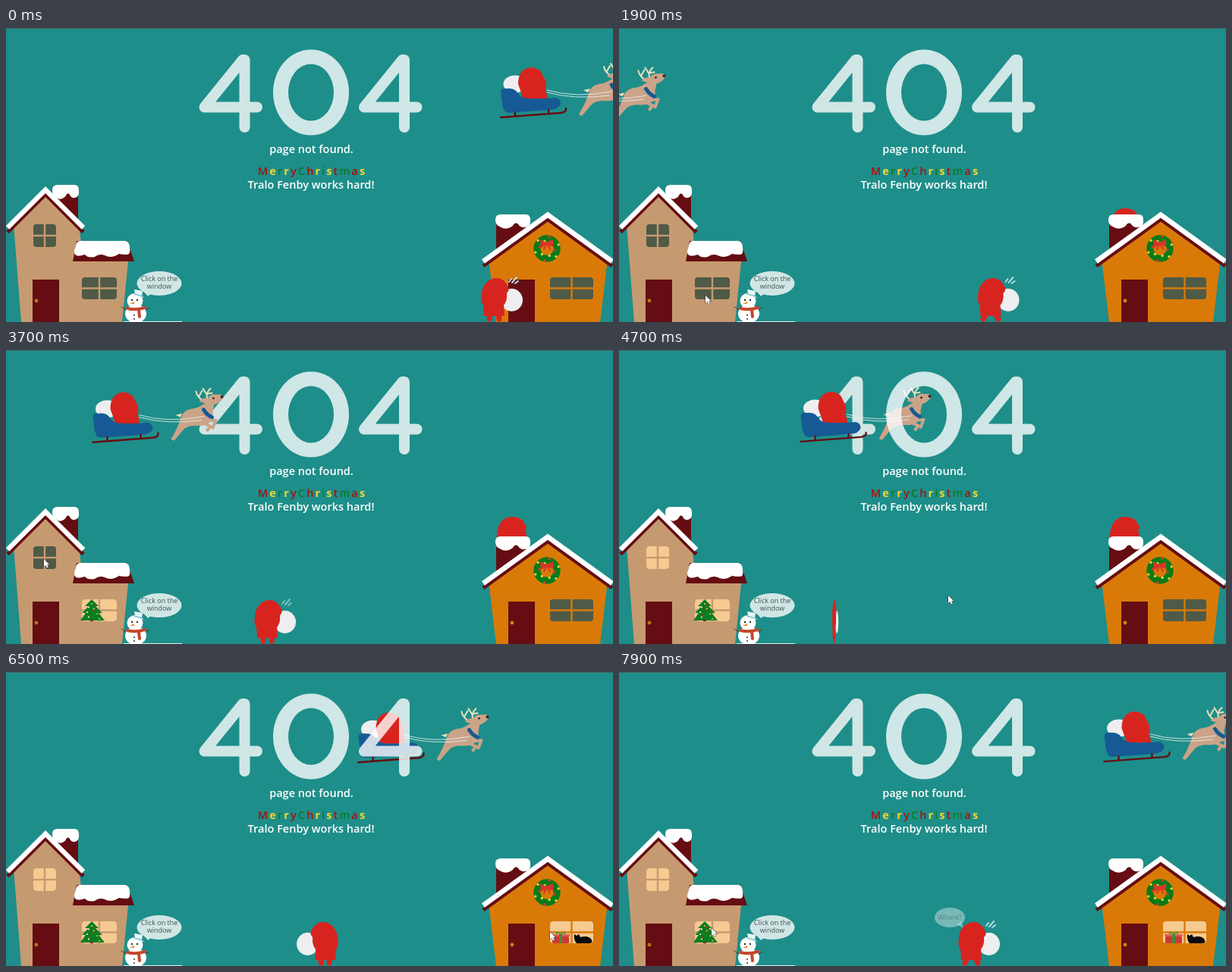
An HTML page with a canvas that plays this animation: 800x388 px, repeating every 8 s.

```html
<!DOCTYPE html>
<html lang="en">
<head>
<meta charset="utf-8">
<title>404 page not found</title>
<style>
html, body { margin: 0; width: 100%; height: 100%; overflow: hidden; background: #1e8e8a; }
canvas { display: block; width: 800px; height: 388px; }
</style>
</head>
<body>
<canvas id="stage"></canvas>
<script>
const W = 800, H = 388, LOOP = 8000;
const canvas = document.getElementById('stage');
const dpr = window.devicePixelRatio || 1;
canvas.width = W * dpr;
canvas.height = H * dpr;
const c = canvas.getContext('2d');

const BG = '#1e8e8a', MAROON = '#650d12', TAN = '#c69a70', ORANGE = '#d97a08',
  DARK = '#4f5a47', LIT = '#f6ca91', RED = '#d8241f', PALE = '#d0e6e5',
  BLUE = '#165a95', FUR = '#cba388', GLASS = 'rgba(255,255,255,.79)';
const FONT = '"Open Sans", "Noto Sans", sans-serif';

// ---------- helpers ----------
function shape(d, fill) {
  c.fillStyle = fill;
  c.fill(new Path2D(d));
}
function line(d, color, width, cap = 'round', join = 'round') {
  c.strokeStyle = color;
  c.lineWidth = width;
  c.lineCap = cap;
  c.lineJoin = join;
  c.stroke(new Path2D(d));
}
function oval(x, y, rx, ry, fill) {
  c.fillStyle = fill;
  c.beginPath();
  c.ellipse(x, y, rx, ry, 0, 0, 7);
  c.fill();
}
function rect(x, y, w, h, fill, r = 0) {
  c.fillStyle = fill;
  c.beginPath();
  c.roundRect(x, y, w, h, r);
  c.fill();
}
function text(str, x, y, size, color, weight = 400, align = 'center') {
  c.font = `${weight} ${size}px ${FONT}`;
  c.textAlign = align;
  c.fillStyle = color;
  c.fillText(str, x, y);
}
const clamp = v => Math.max(0, Math.min(1, v));
const smooth = v => v * v * (3 - 2 * v);
const ramp = (t, a, b) => clamp((t - a) / (b - a));

// Keys are [time, value, value...]
function track(t, keys, ease = v => v) {
  let i = 0;
  while (i < keys.length - 2 && t >= keys[i + 1][0]) i++;
  const a = keys[i], b = keys[i + 1], k = ease(ramp(t, a[0], b[0]));
  return a.slice(1).map((v, n) => v + (b[n + 1] - v) * k);
}

// ---------- lettering ----------
function four(x, color) {
  line(`M${x + 60.5} 42 V131 M${x + 58} 42 L${x + 7.5} 104.5 H${x + 77}
    M${x + 58} 42 H${x + 60.5}`, color, 14);
}
function zero() {
  c.fillStyle = GLASS;
  c.beginPath();
  c.ellipse(402, 85, 50, 56.5, 0, 0, 7);
  c.ellipse(402, 85, 30, 37.5, 0, 0, 7);
  c.fill('evenodd');
}
function greeting() {
  const word = 'MerryChristmas', hues = 'rygyrgrygyrgry';
  const paint = { r: '#a8100f', y: '#f6d62c', g: '#0b7a26' };
  const weight = i => hues[i] === 'y' ? 700 : 600;
  const widths = [...word].map((ch, i) => {
    c.font = `${weight(i)} 14.5px ${FONT}`;
    return c.measureText(ch).width + 2.1;
  });
  let x = 403.5 - widths.reduce((a, b) => a + b) / 2;
  [...word].forEach((ch, i) => {
    text(ch, x, 194, 14.5, paint[hues[i]], weight(i), 'left');
    x += widths[i];
  });
}
function captions() {
  text('page not found.', 402.5, 165, 14.5, '#fff', 600);
  greeting();
  text('Tralo Fenby works hard!', 402, 212, 14.5, '#fff', 600);
}

// ---------- houses ----------
function panes(x, y, w, h, wall, glow, decor) {
  rect(x, y, w, h, DARK, 4);
  if (glow > 0) {
    c.save();
    c.globalAlpha = glow;
    rect(x, y, w, h, LIT, 4);
    c.restore();
  }
  rect(x + w / 2 - 1.2, y, 2.4, h, wall);
  rect(x, y + h / 2 - 1.2, w, 2.4, wall);
  if (glow > 0 && decor) {
    c.save();
    c.globalAlpha = glow;
    decor();
    c.restore();
  }
}
function door(x, knob) {
  rect(x, 332, 35, 56, MAROON);
  oval(x + 5, 360, 2.4, 2.4, knob);
}
function cap(x, y, w) {
  shape(`M${x} ${y + 7} Q${x} ${y} ${x + 7} ${y} H${x + w - 6} Q${x + w} ${y} ${x + w} ${y + 7}
    Q${x + w + 1} ${y + 16} ${x + w * .85} ${y + 17} Q${x + w * .7} ${y + 18} ${x + w * .64} ${y + 12}
    Q${x + w * .55} ${y + 10} ${x + w * .5} ${y + 15} Q${x + w * .3} ${y + 22} ${x + w * .12} ${y + 16}
    Q${x} ${y + 14} ${x} ${y + 7}Z`, '#fff');
}
function roof(x, y, w, h) {
  const slope = dy => `M${x - w} ${y + h + dy} L${x} ${y + dy} L${x + w} ${y + h + dy}`;
  line(slope(6), MAROON, 5, 'butt', 'miter');
  line(slope(0), '#fff', 6.5, 'butt', 'miter');
}
function pineTree() {
  shape('M113 329 L122 338 H118 L127 347 H122 L130 357 H98 L105 347 H100 L109 338 H104Z', '#0b7d22');
  const dots = ['#e9d23c', '#d8241f', '#fff'];
  for (let i = 0; i < 10; i++) {
    const y = 335 + i * 2.2;
    oval(113 + Math.sin(i * 2.3) * (y - 330) * .42, y, 1, 1, dots[i % 3]);
  }
  rect(111, 356, 4, 2, '#6b3a1c');
}
function giftAndCat() {
  rect(720, 349, 22, 9, '#c93a31', 1);
  rect(719, 346, 24, 3, '#e0604c', 1);
  rect(729, 346, 4, 12, '#3d8c3e');
  line('M731 346 Q724 341 726 346 M731 346 Q738 341 736 346', '#3d8c3e', 1.4);
  shape('M749 346 L752 348 L755 346 L757 350 Q766 347 771 352 Q775 358 768 358 H752 Q748 354 749 346Z', '#0b0b0b');
}
function leftHouse(t) {
  rect(62, 216, 33, 48, MAROON);
  cap(61, 207, 35);
  shape('M52 214 L96 260 L102 308 H161 L153 388 H20 L10 258Z', TAN);
  shape('M93 281 H160 L169 308 H88Z', MAROON);
  shape(`M92 287 Q93 280 99 281 H157 Q162 281 163 289 Q165 300 158 299 Q152 299 149 298
    Q139 305 130 300 Q123 297 117 302 Q108 304 104 299 Q89 304 90 294Z`, '#fff');
  roof(52, 213.5, 50, 50);
  panes(36, 259, 30, 30, TAN, ramp(t, 3900, 4400));
  panes(100, 329, 46, 29, TAN, ramp(t, 2200, 2700), pineTree);
  door(35, '#b57b16');
}
function wreath() {
  c.strokeStyle = '#087b1a';
  c.lineWidth = 9;
  c.beginPath();
  c.arc(713, 291, 13.2, 0, 7);
  c.stroke();
  for (let i = 0; i < 12; i++) {
    const a = i * .5236 + .2, r = 13 + (i % 2 ? 3 : -3);
    oval(713 + Math.cos(a) * r, 291 + Math.sin(a) * r, 1.7, 1.7, i % 3 ? '#e8d33a' : '#d33a27');
  }
  shape('M704 279 L712 283 L721 279 V289 L713 286 L705 290Z', '#d9342b');
  line('M712 286 L709 292 M714 286 L717 292', '#d9342b', 2);
}
function rightHouse(t) {
  rect(646, 256, 44, 48, MAROON);
  cap(645, 246, 46);
  shape('M714 248 L793 304 L783 388 H646 L636 304Z', ORANGE);
  roof(714, 246.5, 85, 61.5);
  wreath();
  panes(717, 329, 57, 29, ORANGE, ramp(t, 5900, 6400), giftAndCat);
  door(662, '#c98a12');
}

// ---------- characters ----------
function bubble(x, y, rx, ry, tail, rows) {
  oval(x, y, rx, ry, PALE);
  shape(tail, PALE);
  const top = y + (rows.length > 1 ? -3 : 3);
  rows.forEach((row, i) => text(row, x, top + i * 10, 9, '#40504f'));
}
function snowman() {
  rect(155, 387, 77, 1, '#e6f1f1');
  line('M158 372 L152 368 M184 372 L189 369', '#5b3a28', 1);
  oval(171, 377, 14, 12, '#fff');
  oval(170, 360, 10.5, 10, '#fff');
  shape('M169 345 L180 347 L179 354 L183 356 L167 353 L170 351Z', '#e9f5f6');
  line('M169 351 L180 354', '#7fc3d1', 1.5);
  oval(166, 359, 1.1, 1.3, '#222');
  oval(173, 359, 1.1, 1.3, '#222');
  shape('M169 361 L163 364 L169 364Z', '#ea8a25');
  line('M160 370 Q171 373 183 369', '#c4472c', 4);
  line('M175 372 L176 381', '#c4472c', 4);
  oval(169, 379, 1, 1, '#333');
  oval(169, 384, 1, 1, '#333');
  bubble(202, 337, 29.5, 16, 'M180 346 L187 354 L192 350Z', ['Click on the', 'window']);
}
function walker(t) {
  const [x] = track(t, [[0, 653], [4555, 285], [4770, 285], [7363, 474], [8000, 474]]);
  const flip = t < 6000 ? 1 - 2 * ramp(t, 4550, 4900) : -1 + 2 * ramp(t, 7300, 7500);
  const swing = t > 7450 ? 2 : Math.sin(t / 130) * 4;
  const face = Math.abs(flip) < .15 ? .15 : flip;
  c.save();
  c.translate(x, 0);
  c.scale(face, 1);
  oval(13.5, 359, 14.5, 15, '#eeeef1');
  line(`M-15 377 L${-16 - swing} 384 M-4 377 L${-3 + swing} 384`, RED, 7);
  shape(`M-26 352 C-26 339 -16 329 -5 330 Q4 331 9 342 Q11 346 7 350
    Q8 360 3 366 L4 380 H-23 L-24 366 Q-28 360 -26 352Z`, RED);
  if (flip > .5) {
    c.globalAlpha = .7 + .3 * Math.cos(t * Math.PI / 500);
    line('M10 335 L13 331 M14 336 L20 329 M18 337 L22 334', '#b9e3e6', 2);
  }
  c.restore();
  const fade = ramp(t, 7600, 8200);
  if (fade > 0) {
    c.save();
    c.globalAlpha = fade;
    bubble(436, 324, 20, 13, 'M446 333 L453 338 L452 329Z', ['Where?']);
    c.restore();
  }
}
function peeker(t) {
  const [y] = track(t, [[0, 252], [1600, 252], [2250, 220], [5450, 220], [6100, 252], [8000, 252]], smooth);
  c.save();
  c.translate(667, y);
  shape('M-20 24 C-19 8 -11 0 0 0 Q13 0 17 10 Q21 14 17 18 Q21 26 18 36 H-18 Q-21 30 -20 24Z', RED);
  c.restore();
}
function reindeer() {
  line('M147 64 Q138 58 137 51 M141 57 L145 50 M152 62 Q149 53 156 47 M151 55 L146 47 M152 54 L158 53', '#eadfbd', 2);
  shape(`M117 86 Q120 76 130 74 Q140 73 146 68 L149 67 L141 64 Q146 59 152 60 Q156 54 163 55
    L170 55 Q174 59 170 63 Q164 68 161 68 L159 77 Q160 87 155 92 Q148 97 136 96
    Q124 96 119 103 L108 116 L104 114 Q112 101 117 86Z`, FUR);
  line('M150 90 L163 89 L159 99 M145 92 L156 97 L152 102', FUR, 4);
  shape('M116 85 L110 82 L119 80Z', '#eadfbd');
  line('M147 75 Q151 82 158 85', BLUE, 5);
  oval(160, 60, 1.3, 1.3, '#222');
  oval(171, 58, 2, 2, '#3a2726');
}
function sleigh(t) {
  const x = (851 + t * .125) % 1000 - 200;
  c.save();
  c.translate(x, -.007 * (x - 650));
  reindeer();
  oval(20, 74, 15.5, 11.5, '#eeeef1');
  shape('M24 74 Q24 53 42 52 Q54 53 57 64 Q63 72 60 81 L63 93 L31 94Z', RED);
  shape(`M1 84 Q2 79 8 80 Q19 79 23 85 Q28 94 40 93 Q58 94 73 92 Q80 93 80 100
    Q78 107 66 108 Q40 110 10 112 Q5 111 3 101Z`, BLUE);
  line('M1 118 L80 112 Q88 111 87 106 M20 111 V116 M64 108 V113', MAROON, 2.4);
  line('M62 82 Q100 93 147 84 M62 85 Q98 95 144 89', 'rgba(226,242,241,.85)', 1);
  c.restore();
}
function pointer(t) {
  if (t < 1400) return;
  const [x, y] = track(t, [[1400, 170, 388], [1800, 114, 353], [3000, 114, 353], [3600, 50, 276],
    [4050, 50, 276], [4500, 434, 324], [4800, 434, 324], [5400, 744, 346], [5900, 744, 346],
    [6300, 717, 343], [6800, 717, 343], [7700, 122, 338], [8000, 122, 338]], smooth);
  c.save();
  c.translate(x, y);
  const arrow = 'M0 0 V10 L2.4 8 L4 11.4 L5.7 10.6 L4.2 7.3 H7.2Z';
  line(arrow, '#333', 1);
  shape(arrow, '#fff');
  c.restore();
}

// ---------- scene ----------
function draw() {
  const t = Math.floor(performance.now() % LOOP / 100) * 100;
  c.setTransform(dpr, 0, 0, dpr, 0, 0);
  rect(0, 0, W, H, BG);
  four(254, PALE);
  sleigh(t);
  zero();
  four(464.5, GLASS);
  captions();
  leftHouse(t);
  peeker(t);
  rightHouse(t);
  snowman();
  walker(t);
  pointer(t);
  rect(0, 0, W, 1, '#46605f');
  requestAnimationFrame(draw);
}
draw();
</script>
</body>
</html>
```
